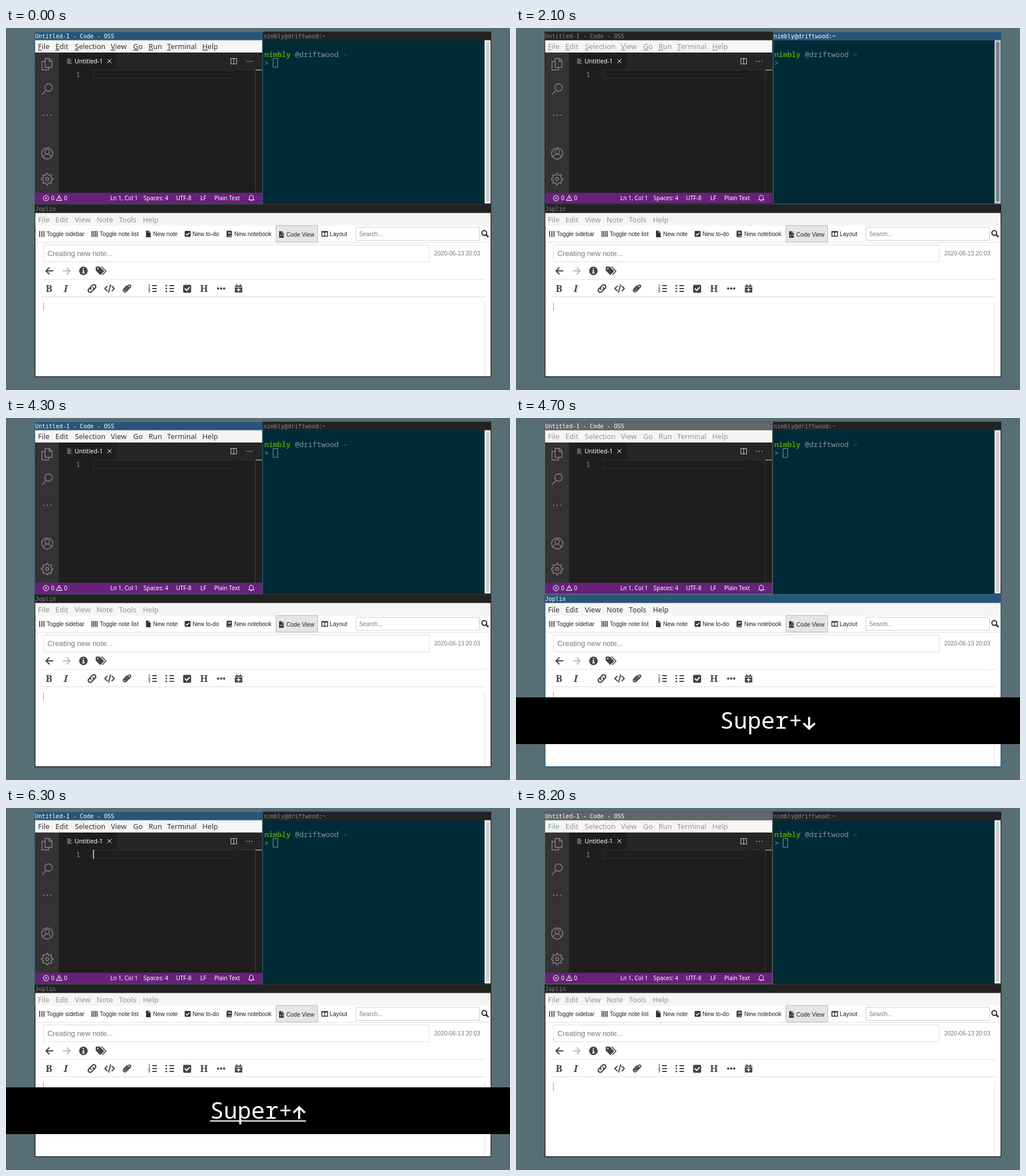
Recreate the animation shown at these times as an HTML page. Size 882 by 635 pixels, loop 8.4 s.

```html
<!DOCTYPE html>
<html lang="en">
<head>
<meta charset="utf-8">
<title>Moving focus between tiled windows</title>
<style>
html, body { margin: 0; width: 100%; height: 100%; overflow: hidden; background: #586e75; }
svg { display: block; width: 882px; height: 635px; fill: none; }
.win { --bar: #222; --edge: #333; --name: #888; --menu: #929595; }
.win.idle { --bar: #5f676a; --edge: #484e50; --name: #fff; }
.win.on { --bar: #285577; --edge: #4c7899; --name: #fff; --menu: #2e3436; }
.frame { fill: var(--bar); }
.edge { stroke: var(--edge); stroke-width: .8; }
.title { fill: var(--name); font: 10px "DejaVu Sans Mono", monospace; }
.menu { fill: var(--menu); font: 12.6px "Noto Sans", sans-serif; }
.keys tspan { text-decoration: underline; }
.ui { font: 10px "Noto Sans", sans-serif; fill: #fff; }
.mono { font: 12.75px "Noto Sans Mono", monospace; fill: #839496; white-space: pre; }
.note { font: 10.2px "Liberation Sans", Arial, sans-serif; fill: #222; }
.slab { font: bold 17px "Noto Serif", serif; fill: #444; }
.side { stroke: #858585; stroke-width: 1.4; }
.fine { stroke: #fff; stroke-width: 1; }
.ink { stroke: #444; stroke-width: 2; stroke-linecap: round; stroke-linejoin: round; }
.dark { fill: #333; }
.rule { stroke: #ddd; }
</style>
</head>
<body>
<svg viewBox="0 0 882 635">
  <g id="code" class="win">
    <path class="frame" d="M50 6.5H449.5V309H50Z"/>
    <path class="edge" d="M50 6.9H449.5M50 21.1H449.5"/>
    <text class="title" x="51" y="18">Untitled-1 - Code - OSS</text>
    <path fill="#f6f5f4" d="M51 21.5H448.2V43H51Z"/>
    <g id="codeMenu" class="menu"></g>
    <path fill="#1e1e1e" d="M51 43H448.2V289H51Z"/>
    <path fill="#333" d="M51 43H92.5V289H51Z"/>
    <path fill="#252526" d="M194 43H448.2V73H194Z"/>
    <path fill="#68217a" d="M51 289H448.2V308H51Z"/>

    <g class="side">
      <path d="M68.500 53.500H76L80.500 58V69H68.500ZM75.500 53.500V58.500H80.500M68 58.500H63V73.500H74.500V69.500"/>
      <circle cx="74.500" cy="104.500" r="6.500"/><path d="M70 109.500L63 117"/>
      <path stroke-width="2" d="M65 153h2M71 153h2M77.500 153h2"/>
      <circle cx="72" cy="220" r="9.800"/><circle cx="72" cy="217" r="4"/>
      <path d="M65 227C66 219.500 78 219.500 79 227"/>
      <path id="gear"/><circle cx="72" cy="265" r="2.700"/>
    </g>

    <path stroke="#bbb" d="M107 54.500h6M107 57h8M107 59.500h6M107 62h8"/>
    <text class="ui" style="font-size:10.6px" x="120" y="62">Untitled-1</text>
    <path class="fine" d="M177.500 54.500l7 7m0-7l-7 7"/>
    <path stroke="#ccc" d="M393.500 53.500h10v9.500h-10ZM398.500 53.500v9.500"/>
    <path stroke="#ccc" stroke-width="1.600" d="M420.500 58.500h1.600M425 58.500h1.600M429.500 58.500h1.600"/>
    <text class="mono" style="fill:#8a8a8a" x="122.500" y="86">1</text>
    <path stroke="#2d2d2d" stroke-width="1.500" d="M400 73.500H152.700V88.500H400"/>
    <path stroke="#23394f" d="M407 73.500H436"/>
    <path stroke="#3a3a3a" d="M436.500 73V289"/>
    <path stroke="#a0a0a0" stroke-width="1.500" d="M437 73.700H448"/>
    <path id="caret" fill="#d4d4d4" d="M152.300 73h1.600v16h-1.600Z"/>

    <g class="fine">
      <circle cx="70" cy="298.500" r="4.800"/><path d="M68 296.500l4 4m0-4l-4 4"/>
      <path d="M93 293.500L98 302.500H88ZM93 296.500v3M93 300.500v1"/>
      <path d="M424.500 301.500H434L432.500 299V296.500C432.500 292 426 292 426 296.500V299ZM428 303h2.500"/>
    </g>
    <g class="ui">
      <text x="79" y="302">0</text><text x="101.500" y="302">0</text>
      <text x="182.500" y="302">Ln 1, Col 1</text><text x="240.500" y="302">Spaces: 4</text>
      <text x="297.500" y="302">UTF-8</text><text x="340" y="302">LF</text><text x="364.500" y="302">Plain Text</text>
    </g>
  </g>

  <g id="term" class="win">
    <path class="frame" d="M449.500 6.500H849.200V309H449.500Z"/>
    <path class="edge" d="M449.500 6.900H849.200M449.500 21.100H849.200"/>
    <text class="title" x="451" y="18">nimbly@driftwood:~</text>
    <path fill="#002b36" d="M451 21.500H838V307.800H451Z"/>
    <path id="trough" d="M837.500 21.500H848V307.800H837.500Z"/>
    <rect id="slider" x="840" y="24" width="6" height="281" rx="3"/>
    <g class="mono">
      <text x="452" y="50.500" style="font-weight:bold;fill:#4e9a06">nimbly</text>
      <text x="505.700" y="50.500">@driftwood</text>
      <text x="590" y="50.500" style="font-weight:bold;fill:#3465a4">~</text>
      <text x="452" y="66">&gt;</text>
    </g>
    <path id="block" stroke="#839496" d="M467.500 53.500h8v15.500h-8Z"/>
  </g>

  <g id="notes" class="win">
    <path class="frame" d="M50 309.300H849.200V612.500H50Z"/>
    <path class="edge" d="M50 309.800H849.200M50 324.200H849.200"/>
    <text class="title" x="51" y="321">Joplin</text>
    <path fill="#fff" d="M51.500 324.800H848V611H51.500Z"/>
    <path fill="#f6f5f4" d="M51.500 324.800H848V347H51.500Z"/>
    <g id="notesMenu" class="menu"></g>
    <path class="rule" d="M51.500 376H848M61 441H839M61 471.500H839M837.700 481V611"/>
    <path fill="#e5e5e5" stroke="#bbb" d="M472.500 346.500H545.500V375.500H472.500Z"/>
    <path stroke="#ccc" d="M612.500 349.500H828.500V372.500H612.500Z"/>
    <path stroke="#ddd" d="M65.500 380.500H740.500V410H65.500Z"/>

    <path stroke="#333" stroke-width="1.600" d="M59 356v10.500M62.800 356v10.500M66.500 356v10.500M150.500 356v10.500M153.500 356v10.500M156.500 356v10.500M159.500 356v10.500"/>
    <g class="dark">
      <path id="page" d="M245 355.500h4.500v3.500h3.700v8h-8.200ZM250.300 355.500l2.900 2.800h-2.900Z"/>
      <use href="#page" x="233" y="1"/>
      <rect x="312.700" y="356" width="10.300" height="10.300" rx="1.300"/>
      <rect x="386" y="355.500" width="9.300" height="11.500" rx="1.500"/>
      <path fill-rule="evenodd" d="M552 356.300h11.500v9.700H552ZM553.400 358.700v5.900h3.700v-5.900ZM558.400 358.700v5.900h3.700v-5.900Z"/>
    </g>
    <path stroke="#fff" stroke-width="1.500" d="M315 361.200l2 2.100 4-4.200"/>
    <path stroke="#fff" d="M388.500 358.500h5M388.500 360.500h5M388 365h7"/>
    <path stroke="#fff" d="M481.500 362l-1.500 1.700 1.500 1.700M483.500 362l1.500 1.700-1.500 1.700"/>
    <circle cx="837" cy="359.500" r="4.200" stroke="#222" stroke-width="1.900"/>
    <path stroke="#222" stroke-width="2.500" d="M840 362.500l4.300 4.200"/>
    <g class="note">
      <text x="71" y="365">Toggle sidebar</text><text x="164" y="365">Toggle note list</text>
      <text x="257.500" y="365">New note</text><text x="326.500" y="365">New to-do</text>
      <text x="399.500" y="365">New notebook</text><text x="490.500" y="366">Code View</text>
      <text x="566.500" y="365">Layout</text>
      <g fill="#777"><text x="618" y="365">Search...</text><text x="749.500" y="398.500">2020-06-13 20:03</text>
      <text x="72.500" y="400" style="font-size:12.8px">Creating new note...</text></g>
    </g>

    <g class="ink">
      <path d="M82 426H70.500M75.500 420.500L70 426l5.500 5.500"/>
      <path stroke="#bbb" d="M100 426H111.500M106.500 420.500L112 426l-5.500 5.500"/>
      <circle cx="135.500" cy="426" r="6.500" fill="#444"/>
      <path stroke="#fff" stroke-width="1.800" stroke-linecap="butt" d="M135.500 421v2M134 425.500h1.600v4M133.500 429.700h4"/>
      <path fill="#444" d="M158 419.500h5.500l7 7-5.500 5.500-7-7Z"/>
      <path stroke-width="1.700" d="M167.500 419l7.500 7.500-6 6"/>
      <circle cx="160.500" cy="422" r=".8" stroke="#fff" stroke-width="1"/>
      <g transform="rotate(-45 150.500 457)" stroke-width="2.200">
        <path d="M149.500 453.500H146a3.500 3.500 0 0 0 0 7H149.500a3.500 3.500 0 0 0 3.500-3.500M151.500 460.500H155a3.500 3.500 0 0 0 0-7H151.500a3.500 3.500 0 0 0-3.500 3.500"/>
      </g>
      <path d="M177 453l-4 4 4 4M185.500 453l4 4-4 4M183 450.500l-3.500 13"/>
      <path stroke-width="1.900" d="M215 454.500l-5 5c-1.500 1.500-3-.2-1.700-1.600l6-6c2.600-2.600 5.500.4 3 3l-6.500 6.700c-3.300 3.200-7.300-.8-4.300-4l5-5.300"/>
      <path d="M256 452h8M256 457h8M256 462h8M286 452h8M286 457h8M286 462h8" stroke-linecap="butt"/>
      <path stroke-width="1" d="M250 450.500l1-.5v3.500M249.700 455.500h2l-2 3h2.300M249.700 460.500h2l-1 1.500c2 0 1.300 2-1 1.500"/>
      <path stroke-width="3" d="M280.500 452h.01M280.500 457h.01M280.500 462h.01"/>
      <rect x="311" y="451.500" width="12" height="12" rx="1" fill="#444"/>
      <path stroke="#fff" d="M313.500 457.500l2.700 2.700 4.700-5"/>
      <path stroke-width="4" d="M371.300 457h.01M376.500 457h.01M381.700 457h.01"/>
      <path fill="#444" d="M401.500 453h11v10h-11ZM404 450.500v2M410 450.500v2"/>
      <path stroke="#fff" stroke-width="1" stroke-linecap="butt" d="M400.500 454.500h13"/>
      <path stroke="#fff" stroke-width="1.700" stroke-linecap="butt" d="M407 456v6.500M403.700 459.200h6.600"/>
    </g>
    <g class="slab">
      <text x="69.500" y="463">B</text>
      <text x="101" y="463" font-style="italic">I</text>
      <text x="339.500" y="463">H</text>
    </g>
    <path stroke="#999" d="M65.500 481v15"/>
  </g>

  <g id="banner">
    <path fill="#000" d="M0 490H882V572H0Z"/>
    <text x="357" y="545" fill="#fff" style="font:500 40px 'Noto Sans Mono',monospace">Super+</text>
    <path id="arrow" stroke="#fff" stroke-width="3.700" d="M502.500 535H523M513.500 525L523 535L513.500 545"/>
    <path id="held" fill="#fff" d="M357 548H525V550H357Z"/>
  </g>
</svg>
<script>
const LOOP = 8400;
const $ = id => document.getElementById(id);
const show = (id, on) => $(id).style.display = on ? '' : 'none';
const within = (t, from, to) => t >= from && t < to;

function fillMenu(id, y, items) {
  $(id).innerHTML = Object.entries(items).map(([word, x]) =>
    `<text x="${x}" y="${y}"><tspan>${word[0]}</tspan>${word.slice(1)}</text>`).join('');
}
fillMenu('codeMenu', 37, { File: 56, Edit: 86.5, Selection: 120.5, View: 183.5, Go: 222.5, Run: 249.5, Terminal: 282, Help: 343.5 });
fillMenu('notesMenu', 340.5, { File: 56, Edit: 86.5, View: 120.5, Note: 158.5, Tools: 197.5, Help: 239.5 });

const teeth = Array.from({ length: 32 }, (_, i) => {
  const a = (i - .5) * Math.PI / 16, r = i % 4 < 2 ? 10 : 7.3;
  return `${72 + r * Math.cos(a)} ${265 + r * Math.sin(a)}`;
});
$('gear').setAttribute('d', `M${teeth.join('L')}Z`);

// Key presses: arrow angle, start, key release, banner end
const presses = [
  [0, 800, 1100, 2100],
  [180, 2800, 3000, 4000],
  [90, 4500, 4700, 5700],
  [-90, 6200, 6500, 7400]
];
const focusAt = t => t < 800 ? 'code' : t < 2800 ? 'term' : t < 4500 ? 'code'
  : t < 6200 ? 'notes' : t < 8200 ? 'code' : '';
const troughAt = t => within(t, 1100, 2900) ? '#cecece'
  : within(t, 900, 1100) || within(t, 2900, 3000) ? '#e2e3e3' : '#f3f3f2';

function draw(t) {
  const focus = focusAt(t);
  for (const id of ['code', 'term', 'notes']) {
    const idle = id === 'code' && focus !== 'term';
    $(id).setAttribute('class', 'win ' + (id === focus ? 'on' : idle ? 'idle' : ''));
  }
  $('codeMenu').classList.toggle('keys', t < 2900);
  show('caret', [300, 2800, 3800, 6300, 7300].some(s => within(t, s, s + 500)));

  $('trough').setAttribute('fill', troughAt(t));
  $('slider').setAttribute('fill', focus === 'term' ? '#7e8182' : '#cfd0cf');
  $('block').setAttribute('fill', within(t, 1100, 2800) ? '#839496' : 'none');
  show('block', !within(t, 1700, 2300));

  const press = presses.find(p => within(t, p[1], p[3]));
  show('banner', press);
  if (press) {
    $('arrow').setAttribute('transform', `rotate(${press[0]} 513 535)`);
    show('held', t < press[2]);
  }
}

const start = performance.now();
function tick() {
  draw((performance.now() - start) % LOOP);
  requestAnimationFrame(tick);
}
tick();
</script>
</body>
</html>
```
